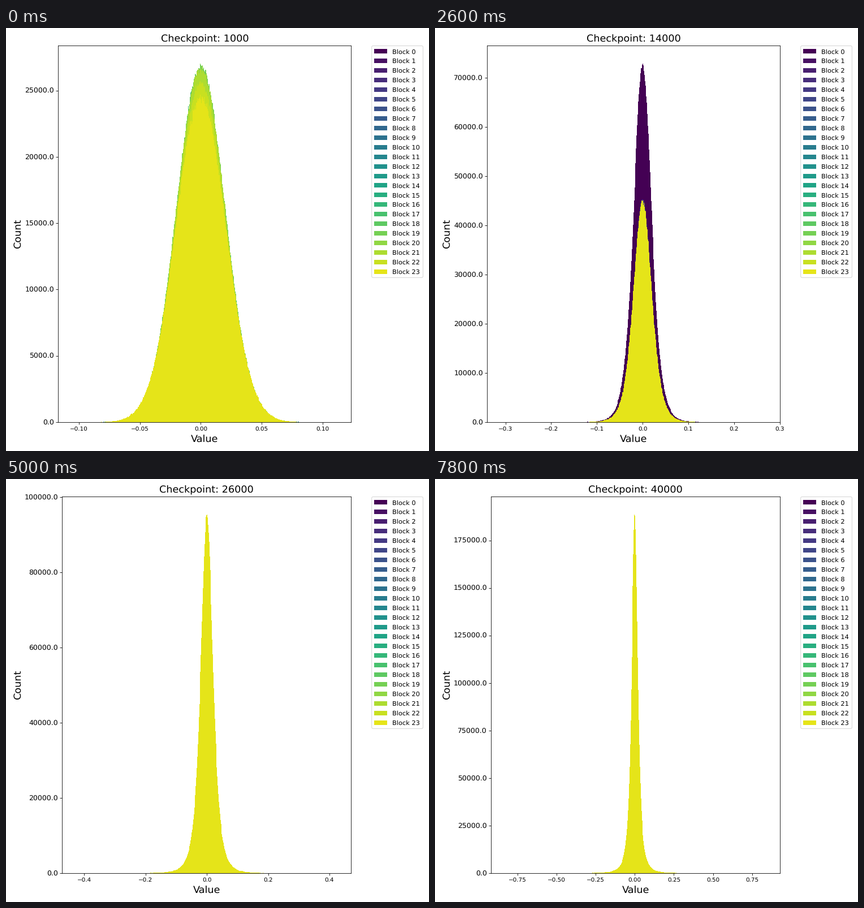
Write a matplotlib script that moves like this. It is 748x748 px and loops after 8000 ms.

```python
import math

import matplotlib.pyplot as plt
import numpy as np
from matplotlib.animation import FuncAnimation
from matplotlib.patches import FancyBboxPatch, Rectangle

SIZE, DPI = 748, 74.8
BLOCKS, BINS, WEIGHTS = 24, 500, 3 * 1024 ** 2
TOP, BOTTOM, RIGHT = 31.2, 697.0, 610.4
FRAMES, INTERVAL = 40, 200

# Last block: step in thousands, reach to the left and right, peak count
LATE = np.array([
    (1, .1169, .1233, 24700),
    (23, .3534, .3412, 72400),
    (30, .6305, .6435, 130800),
    (35, .8073, .8107, 165300),
    (40, .917, .9285, 188600),
]).T

plt.rcParams["font.family"] = "DejaVu Sans"
plt.rcParams["text.hinting"] = "none"
fig = plt.figure(figsize=(SIZE / DPI, SIZE / DPI), dpi=DPI, facecolor="white")
colors = [plt.cm.viridis(i / BLOCKS) for i in range(BLOCKS)]

page = fig.add_axes([0, 0, 1, 1])
page.set(xlim=(0, SIZE), ylim=(SIZE, 0))
page.axis("off")
ax = fig.add_axes([.1, .1, .7, .8])
ax.tick_params(axis="y", labelsize=12)
ax.yaxis.set_major_formatter(lambda v, _: f"{v:.1f}")
ax.set_xlabel("Value", fontsize=17, va="baseline")
ax.set_ylabel("Count", fontsize=17, va="baseline")
ax.xaxis.set_label_coords(.5, (BOTTOM - 733) / (BOTTOM - TOP))
title = ax.set_title("", fontsize=17)
bars = [ax.stairs(np.zeros(BINS), np.linspace(-1, 1, BINS + 1), fill=True,
                  color=c, antialiased=False) for c in colors]


def draw_legend():
    page.add_patch(FancyBboxPatch(
        (646.7, 31.5), 90.7, 409.8, boxstyle="round,pad=0,rounding_size=2.3",
        facecolor="white", edgecolor="0.8", linewidth=1, alpha=.8))
    for i, color in enumerate(colors):
        base = 45.35 + 16.935 * i
        page.add_patch(Rectangle((651.1, base - 8), 22.9, 8, color=color, linewidth=0))
        page.text(682.6, base, f"Block {i}", fontsize=11, va="baseline")


def settle(step, tau):
    """Early growth that levels off and then holds."""
    return 1 - math.exp(-(min(step, 14) - 1) / tau)


def late(step, row):
    return np.interp(step, LATE[0], LATE[row])


def peak_count(i, step):
    rise = settle(step, 5.2)
    if i == 0:
        return 24000 + 53250 * rise
    if i == BLOCKS - 1:
        surge = 24700 + 20000 * rise + 27600 * ((step - 1) / 22) ** 5
        return min(late(step, 3), surge)
    start = np.interp(i, [0, 19, 21, 23], [24000, 27040, 26750, 24700])
    limit = 47200 if i < 5 else 42500
    return start + (limit - start) * rise


def x_limits(step):
    left = .1169 + .2431 * settle(step, 5.2)
    right = .1233 + .2225 * settle(step, 8.1)
    return -max(left, late(step, 1)), max(right, late(step, 2))


def histogram(i, step):
    """Noisy counts and bin edges of a Student-t whose tails grow with training."""
    peak = peak_count(i, step)
    scale = .0205 if i == BLOCKS - 1 else .0199
    nu = 1 / (.01 + .0107 * (step - 1))
    power = (nu + 1) / 2
    area = scale * math.sqrt(nu * math.pi) * math.gamma(nu / 2) / math.gamma(power)
    half = BINS * peak * area / WEIGHTS / 2
    edges = np.linspace(-half, half, BINS + 1)
    mid = (edges[1:] + edges[:-1]) / 2
    mean = peak * (1 + (mid / scale) ** 2 / nu) ** -power
    rng = np.random.default_rng(100 * step + i)
    counts = np.maximum(mean + rng.normal(size=BINS) * np.sqrt(mean), 0)
    return counts * peak / counts.max(), edges


def draw(n):
    step = n + 1
    y_max = 0
    for i, bar in enumerate(bars):
        counts, edges = histogram(i, step)
        bar.set_data(counts, edges, 0)
        y_max = max(y_max, 1.05 * counts.max())

    # Six-digit tick labels push the axes to the right
    left = 99.3 if y_max >= 100000 else 92.3
    width = RIGHT - left
    ax.set_position([left / SIZE, 1 - BOTTOM / SIZE, width / SIZE, (BOTTOM - TOP) / SIZE])
    ax.set_xlim(x_limits(step))
    ax.set_ylim(0, y_max)
    ax.yaxis.set_label_coords((26 - left) / width, .5)
    title.set_text(f"Checkpoint: {step * 1000}")
    return bars


draw_legend()
anim = FuncAnimation(fig, draw, frames=FRAMES, interval=INTERVAL,
                     init_func=lambda: draw(0), repeat=True, repeat_delay=0, blit=False)
plt.show()
```
